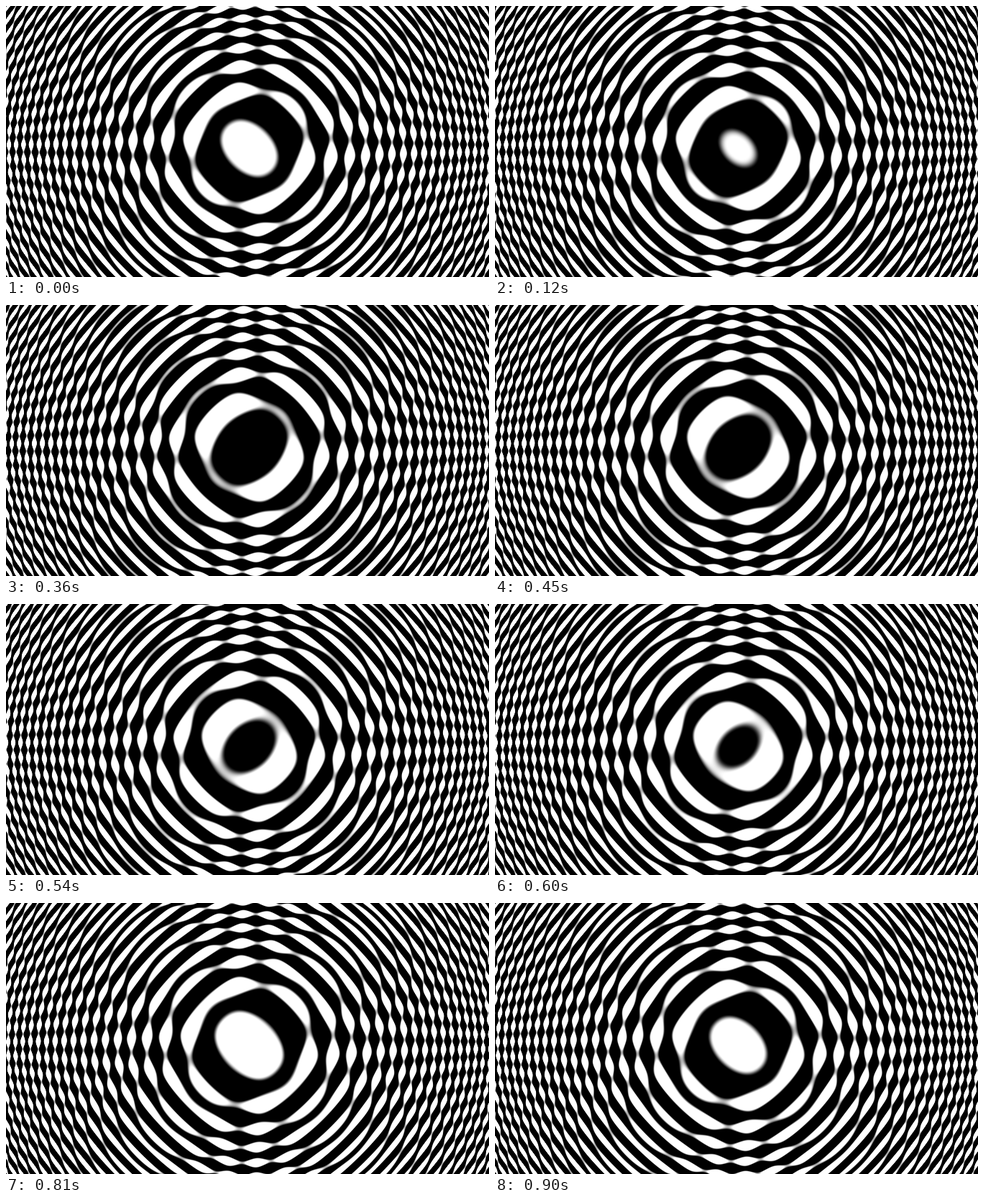
An HTML page with a canvas that plays this animation: 672 px wide and 378 px high, repeating every 0.93 s.

```html
<!DOCTYPE html>
<html lang="en">
<head>
<meta charset="utf-8">
<title>Interference rings</title>
<style>
  html, body { margin: 0; width: 100%; height: 100%; overflow: hidden; background: #000; }
  canvas { display: block; width: 672px; height: 378px; }
</style>
</head>
<body>
<canvas id="stage" width="672" height="378"></canvas>
<script>
const W = 672, H = 378;
const CENTER = { x: 338, y: 198 };
const SCALE = 2 * Math.PI / 6580;          // phase per squared pixel
const WARP = 0.67;                         // strength of the hyperbolic wave
const SOFT_LOW = -0.02, SOFT_HIGH = 0.53;  // black to white transition
const STEP = 30, CYCLE = 900, LOOP = 930;

const ctx = document.getElementById('stage').getContext('2d');
const image = ctx.createImageData(W, H);
const pixels = new Uint32Array(image.data.buffer);
const ringCos = new Float32Array(W * H);
const ringSin = new Float32Array(W * H);
const saddle = new Float32Array(W * H);

for (let y = 0, i = 0; y < H; y++) {
  for (let x = 0; x < W; x++, i++) {
    const dx = x - CENTER.x, dy = y - CENTER.y;
    const ring = SCALE * (dx * dx + dy * dy);
    ringCos[i] = Math.cos(ring);
    ringSin[i] = Math.sin(ring);
    saddle[i] = WARP * Math.sin(SCALE * dx * dy);
  }
}

function smoothstep(low, high, value) {
  const u = Math.min(1, Math.max(0, (value - low) / (high - low)));
  return u * u * (3 - 2 * u);
}

function draw(time) {
  const phase = 2 * Math.PI * time / CYCLE;
  const c = Math.cos(phase), s = Math.sin(phase);
  for (let i = 0; i < pixels.length; i++) {
    const wave = ringCos[i] * c - ringSin[i] * s + saddle[i];
    const gray = Math.round(255 * smoothstep(SOFT_LOW, SOFT_HIGH, wave));
    pixels[i] = 0xff000000 | gray * 0x010101;
  }
  ctx.putImageData(image, 0, 0);
}

let shown = 0;
const start = performance.now();

function tick() {
  const elapsed = (performance.now() - start) % LOOP;
  const time = Math.floor(elapsed / STEP) * STEP;
  if (time !== shown) {
    shown = time;
    draw(time);
  }
  requestAnimationFrame(tick);
}

draw(0);
requestAnimationFrame(tick);
</script>
</body>
</html>
```
